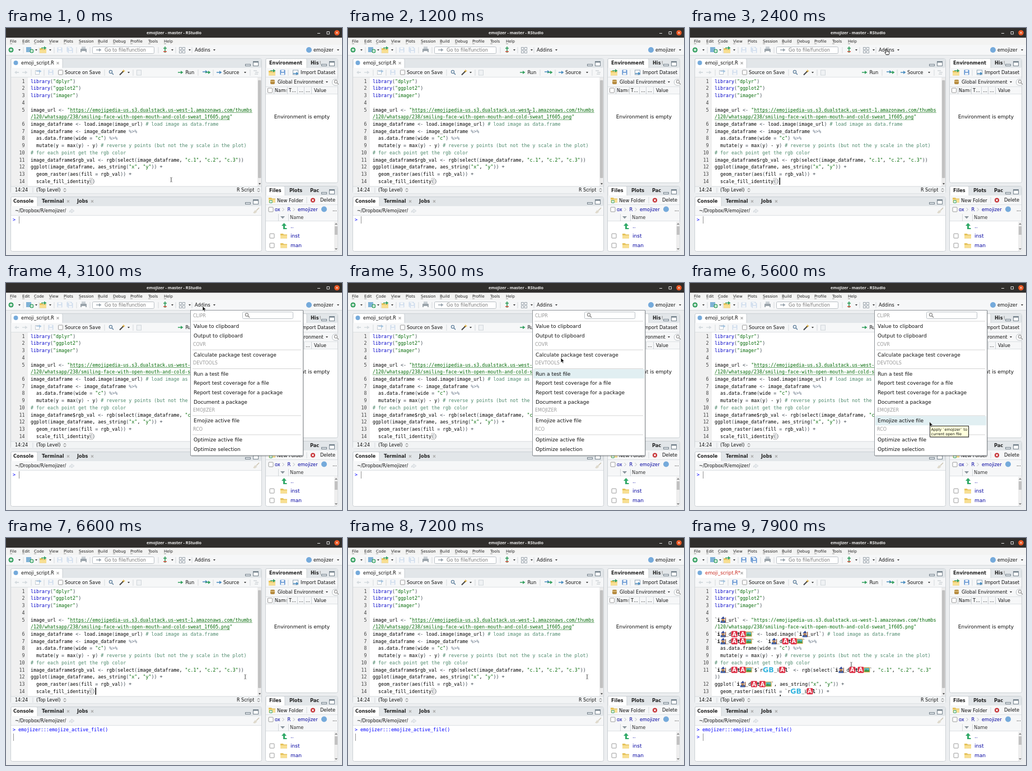
Animation, 600 px wide and 404 px high, one loop 8 s. Source, as an HTML page:

```html
<!DOCTYPE html>
<html lang="en">
<head>
<meta charset="utf-8">
<title>Emojizer addin</title>
<style>
html, body { margin: 0; width: 100%; height: 100%; overflow: hidden; background: #eceef0 }
svg { display: block; width: 600px; height: 404px }
text { white-space: pre; font-family: "DejaVu Sans", sans-serif }
.mono { font-family: "DejaVu Sans Mono", monospace }
.title { font-family: "Noto Sans", sans-serif }
</style>
</head>
<body>
<svg id="stage" viewBox="0 0 600 404"></svg>
<script>
const CW = 5.01, ROW = 12.73, MONO = CW / 0.602;
const LINK = '#0000a0', BLUE = '#0000ff', GREEN = '#036a07', BACK = '#eceef0', STRIP = '#e2e6e9', EDGE = '#cbd0d4';

// Drawing helpers return SVG markup; y of a text is its middle.
const rect = (x, y, w, h, fill, more = '') =>
  `<rect x="${x}" y="${y}" width="${w}" height="${h}" fill="${fill}" ${more}/>`;
const frame = (x, y, w, h, stroke, fill = '#fff', r = 0) =>
  rect(x + .5, y + .5, w - 1, h - 1, fill, `stroke="${stroke}" rx="${r}"`);
const circle = (x, y, r, fill, more = '') => `<circle cx="${x}" cy="${y}" r="${r}" fill="${fill}" ${more}/>`;
const path = (d, fill, stroke = 'none', w = 1) =>
  `<path d="${d}" fill="${fill}" stroke="${stroke}" stroke-width="${w}"/>`;
const line = (d, stroke, w = 1) => path(d, 'none', stroke, w);
const group = (id, body, more = '') => `<g id="${id}" ${more}>${body}</g>`;
const esc = s => s.replace(/&/g, '&amp;').replace(/</g, '&lt;');
const text = (x, y, s, size = 8.25, fill = '#111', more = '') =>
  `<text x="${x}" y="${y + size * .36}" font-size="${size}" fill="${fill}" ${more}>${esc(s)}</text>`;
const bold = (x, y, s) => text(x, y, s, 8.2, '#222', 'font-weight="700"');
const mono = (x, y, s, fill, more = '') => text(x, y, s, MONO, fill, 'class="mono" ' + more);

// Icons
const caret = (x, y) => path(`M${x - 2} ${y - 1}h4l-2 2.5z`, '#333');
const chevron = (x, y) => line(`M${x - 1.5} ${y - 3}l3 3l-3 3`, '#b4b9bd');
const cross = (x, y, c = '#aaa') => line(`M${x - 2} ${y - 2}l4 4m0-4l-4 4`, c, 1.2);
const sep = (x, y) => line(`M${x} ${y - 5}v11`, '#d5d9dc');
const check = (x, y) => frame(x - 4.5, y - 4.5, 9, 9, '#9a9a9a', '#fff', 1);
const plus = (x, y, r = 4.5) => circle(x, y, r, '#35a060') + line(`M${x - 2.5} ${y}h5M${x} ${y - 2.5}v5`, '#fff', 1.4);
const folder = (x, y) => path(`M${x - 6} ${y - 4}h5l1 1.5h6v7h-12z`, '#e5c25c') +
  rect(x - 6, y - 1, 12, 5, '#f8df92');
const disk = (x, y, c = '#5b8fd0') => rect(x - 4.5, y - 4.5, 9, 9, c, 'rx="1"') +
  rect(x - 2.5, y - 4, 5, 3, '#fff') + rect(x - 3, y + .5, 6, 4, '#eef3f8');
const arrow = (x, y, c) => line(`M${x - 5} ${y}h7`, c, 1.5) + path(`M${x} ${y - 3}l4.5 3l-4.5 3z`, c);
const glass = (x, y, c) => circle(x, y, 2.6, 'none', `stroke="${c}" stroke-width="1.2"`) +
  line(`M${x + 2} ${y + 2}l3 3`, c, 1.5);
const lines = (x, y, c) => line(`M${x - 4} ${y - 3}h6m-3 3h6m-7 3h6`, c, 1.2);
const paneButtons = (x, y) => frame(x - 5, y + 1, 10, 4, '#75828c', '#dfe4e8') +
  frame(x + 9, y - 4, 10, 9, '#75828c') + rect(x + 9, y - 4, 10, 2.5, '#75828c');
const pane = (x, y, w, h) => frame(x, y, w, h, EDGE, '#fff', 3) + rect(x + 1, y + 1, w - 2, 16, STRIP, 'rx="2"');
const tab = (x, y, w) => path(`M${x} ${y + 17}v-15q0-2 2-2h${w - 4}q2 0 2 2v15z`, '#fff', EDGE);
const bar = (x, y, w, h = 17) => rect(x, y, w, h, '#f6f7f8') + line(`M${x} ${y + h - .5}h${w}`, '#dde1e4');

// Emoji drawn at the left edge x of a code row with middle y
const badge = (x, y) => rect(x - .3, y - 5.5, 11, 11, '#dd2e44', 'rx="1.5"') +
  text(x + 5.2, y, 'A', 10, '#fff', 'font-weight="700" text-anchor="middle"');
const mage = (x, y) => path(`M${x + 1} ${y + 5.5}q0-5 4.5-5t4.5 5z`, '#3d5fa8') + circle(x + 5.3, y - .5, 2.7, '#d9a066') +
  path(`M${x + 1.5} ${y - 1.5}l4.5-4.5l3 4.5z`, '#384f9b') + path(`M${x + 3} ${y + .5}h5l-2.5 4z`, '#8b6a52') +
  line(`M${x + 10} ${y - 4}v9`, '#8a4b22', 1.2);
const picture = (x, y) => rect(x, y - 4.5, 11, 9, '#d9a441') + rect(x + 1.2, y - 3.3, 8.6, 6.6, '#55b8c8') +
  path(`M${x + 1.2} ${y + 3.3}v-2l3-2.5l2.5 2l1.5-1l1.6 1.5v2z`, '#3f9a4c');
const letters = (x, y) => text(x, y, 'GB', 12.5, '#35b5e0', 'font-weight="700"');
const victory = (x, y) => line(`M${x + 1} ${y - 3}l1 4l1.3-4M${x + 1.3} ${y + 1}h2v2h-2z`, '#777', .9);
const GLYPHS = { '§': [mage, 10.5], 'Å': [badge, 10.5], '¤': [picture, 10.5], 'Ø': [letters, 20], '¢': [victory, 4.5] };
const THICK = { 'ï': 'i', 'ŧ': 't', 'ł': 'l' };

function codeRow(s, y, underline) {
  let x = 44, out = '';
  const tokens = s.match(/#.*|"[^"]*("|$)|^\/120.*|library|<-|%>%|[§Å¤Ø¢ïŧł]|[()+=]| +|[^ "()§Å¤Ø¢ïŧł]+/g) || [];
  for (const k of tokens) {
    if (GLYPHS[k]) {
      out += GLYPHS[k][0](x, y);
      x += GLYPHS[k][1];
    } else if (THICK[k]) {
      out += mono(x - .3, y, THICK[k], '#000', 'font-weight="700"');
      x += 4.5;
    } else {
      const fill = k[0] == '#' ? '#4c886b' : /^"|^\/120/.test(k) ? GREEN : k == 'library' ? '#0000c8' :
        k == '%>%' ? '#687687' : /^(<-|[()+=])$/.test(k) ? '#3c4650' : '#000';
      out += mono(x, y, k, fill);
      if (underline && /https|^\/120/.test(k)) {
        const start = k[0] == '"' ? CW : 0;
        out += line(`M${x + start} ${y + 4.9}h${(k.length - 1) * CW}`, GREEN, .6);
      }
      x += k.length * CW;
    }
  }
  return out;
}

// A row starting with "~" continues the line above.
function listing(src, underline) {
  let n = 0;
  return src.split('\n').map((s, i) => {
    const y = 94.6 + i * ROW, wrapped = s[0] == '~';
    return (wrapped ? '' : mono(33.5, y, String(++n), '#444', 'text-anchor="end"')) +
      codeRow(wrapped ? s.slice(1) : s, y, underline);
  }).join('');
}

const HEAD = 'library("dplyr")\nlibrary("ggplot2")\nlibrary("imager")\n\n';
const URL_ROWS = ' <- "https://emojipedia-us.s3.dualstack.us-west-1.amazonaws.com/thumbs\n' +
  '~/120/whatsapp/238/smiling-face-with-open-mouth-and-cold-sweat_1f605.png"\n';
const script = (url, df, val, wrap) => HEAD + url + URL_ROWS +
`${df} <- load.image(${url}) # load image as data.frame
${df} <- ${df} %>%
  as.data.frame(wide = "c") %>%
  mutate(y = max(y) - y) # reverse y points (but not the y scale in the plot)
# for each point get the rgb color
${df}$${val} <- rgb(select(${df}, "c.1", "c.2", "c.3"${wrap}))
ggplot(${df}, aes_string("x", "y")) +
  geom_raster(aes(fill = ${val})) +
  scale_fill_identity()`;
const plainCode = script('image_url', 'image_dataframe', 'rgb_val', '');
const emojiCode = script('`ï§_url`', '`ï§_dÅŧÅ¤`', '`rØ_¢Åł`', '\n~');

function windowTop() {
  let s = rect(0, 0, 600, 17.5, '#302e2c') +
    text(300, 8.7, 'emojizer - master - RStudio', 7.3, '#eee', 'class="title" font-weight="700" text-anchor="middle"') +
    line('M556 9.5h5M573 6.5h4.500v4.500h-4.500z', '#ddd') + circle(591, 8.5, 4.8, '#e95420') +
    line('M589.200 6.700l3.600 3.600m0-3.600l-3.600 3.600', '#fff') +
    rect(0, 17.5, 600, 13, '#f3f3f2') + rect(0, 30, 600, 18, '#f6f7f8') + line('M0 48.500h600', '#d5d9dc');
  const menus = { File: 7, Edit: 29, Code: 50, View: 77, Plots: 103, Session: 130, Build: 164, Debug: 191, Profile: 222, Tools: 254, Help: 282 };
  for (const m in menus) s += text(menus[m], 23.7, m, 7, '#222') + line(`M${menus[m]} 28h4`, '#555', .6);
  return s + plus(9, 39) + caret(24, 39) + sep(31, 39) + rect(36, 34, 9, 9, '#7fb2d6') + plus(46, 41, 3.5) + caret(54, 39) + sep(59, 39) +
    folder(66, 40) + arrow(68, 35.5, '#35a060') + caret(79, 39) + sep(86, 39) +
    group('saveTop', disk(96, 39) + disk(113, 38) + disk(115, 40)) + sep(126, 39) +
    rect(133, 37, 11, 6, '#9aa3aa', 'rx="1"') + rect(135, 33, 7, 4, '#c9d0d5') + rect(135, 41, 7, 3, '#fff') + sep(150, 39) +
    frame(154, 33, 111, 13, '#b9bfc4', '#fff', 2) + arrow(166, 39, '#9aa5ae') + text(176, 39.3, 'Go to file/function', 8.25, '#777') +
    sep(272, 39) + line('M281 36h6M284 33v11', '#2e9a58', 1.6) + line('M281 42h6', '#d84a3a', 1.6) + caret(297, 39) + sep(303, 39) +
    [309, 315].map(x => frame(x, 34, 5, 5, '#9aa4ac') + frame(x, 40, 5, 5, '#9aa4ac')).join('') + caret(328, 39) + sep(332, 39) +
    text(337, 39, 'Addins') + caret(372, 39) +
    circle(541, 39, 5, '#75aadb') + text(549, 39, 'emojizer') + caret(593, 39);
}

const editorChrome = () => pane(8, 54, 449, 241) + tab(9, 54.5, 92) + circle(17.5, 62, 4, '#75aadb') +
  group('tabClean', text(27, 62, 'emoji_script.R', 8.35)) + group('tabDirty', text(27, 62, 'emoji_script.R*', 8.35, '#c8281e')) +
  cross(92.5, 62.5) + paneButtons(432, 63) + bar(9, 71, 447) +
  path('M23 78h-4v-2l-4 3l4 3v-2h4z', '#d5dbdf') + arrow(34, 79, '#d5dbdf') + sep(45, 79) + frame(52, 75, 8, 8, '#c3cad0') +
  arrow(59, 77, '#a5c3df') + sep(68, 79) + group('saveDoc', disk(80, 79)) + check(97.5, 79) + text(105, 79, 'Source on Save') + sep(176, 79) +
  glass(187, 78, '#5f7f9d') + line('M203 83.500l7-7', '#444', 2) + line('M210 74v5m-2.500-2.500h5', '#e0aa2c') + caret(219, 79) + sep(227, 79) +
  frame(233, 74.5, 9, 10, '#cfd5da', '#f0f2f4') + arrow(312, 79, '#35a060') + text(320.5, 79, 'Run') + sep(343, 79) +
  arrow(356, 78, '#4c8ec0') + arrow(361, 79, '#35a060') + sep(370, 79) + arrow(381, 79, '#4c8ec0') + text(388, 79, 'Source') + caret(427, 79) + sep(436, 79) +
  lines(446, 79, '#bcc3c8') + rect(9, 88, 30, 194, '#f0f0f0') + rect(449, 88, 7, 194, '#ececec') + rect(450, 93, 5.5, 174, '#c1c1c1', 'rx="1"') +
  path('M451 276l2 3l2-3z', '#555');

const editorStatus = () => rect(9, 282, 447, 12.5, '#f2f4f5') + line('M9 282h447', '#d5d9dc') + text(16, 288.5, '14:24', 8) + line('M48 284v9', '#d5d9dc') +
  text(54, 288.5, '(Top Level)', 8) + line('M103 287.500l2-2l2 2m-4 2l2 2l2-2', '#444', .9) +
  text(412, 288.5, 'R Script', 8) + line('M449 287.500l2-2l2 2m-4 2l2 2l2-2', '#444', .9);

const consolePane = () => pane(8, 300, 449, 98) + tab(9, 300.5, 47) + bold(13, 308.5, 'Console') + bold(64, 308.5, 'Terminal') +
  cross(111, 308.5) + bold(127, 308.5, 'Jobs') + cross(154, 308.5) + paneButtons(432, 309) +
  bar(9, 317, 447) + text(16, 325.5, '~/Dropbox/R/emojizer/', 8) + path('M113 328q0-4 4-4v-2l5 3.500l-5 3.500v-2q-3 0-4 1z', '#e8ebee', '#c5cbd0', .6) +
  line('M452 320l-5 5', '#c8bfa8', 1.2) + path('M441 329l4-5l3.500 3l-4 3z', '#ded9cc') +
  mono(12, 341.5, '>', BLUE) +
  group('idle', line('M23.500 335v13', '#777', .8)) +
  group('command', mono(22, 341.5, 'emojizer:::emojize_active_file()', BLUE)) +
  group('busy', line('M13.500 348v13', '#777', .8)) +
  group('ready', mono(12, 354, '>', BLUE) + line('M23.500 348v13', '#777', .8));

const environment = () => pane(463, 54, 130, 222) + tab(464, 54.5, 73) + bold(470, 62, 'Environment') + bold(544, 62, 'His') + text(560, 62, 't', 8.2, '#888') +
  rect(562, 55, 30, 15, STRIP) + paneButtons(568, 63) + bar(464, 71, 128) + folder(475, 80) + arrow(477, 76, '#35a060') + disk(494, 79) + sep(504, 79) +
  frame(512, 74.5, 10, 9, '#8ea2b3') + arrow(518, 81, '#4c8ec0') + text(526, 79, 'Import Dataset') + bar(464, 88, 128) +
  rect(472, 92, 8, 8, '#b58a3f', 'rx="2"') + line('M472 95h8', '#f0d9a0') + text(485, 96, 'Global Environment') + caret(573, 96) +
  frame(582, 90.5, 14, 12, '#b9bfc4', '#fff', 5) + rect(592.5, 89, 7.5, 15, BACK) + glass(589, 95.5, '#999') +
  bar(464, 105, 128, 13) + check(471.5, 111) + text(480, 111.3, 'Nam', 8) + text(498, 111.3, 'e', 8, '#999') + text(505, 111.3, 'T…', 8) +
  text(523, 111.3, '…', 8) + text(535, 111.3, '…', 8) + text(550, 111.3, 'Value', 8) +
  line('M478.500 105v13M502.500 105v13M520.500 105v13M532.500 105v13M545.500 105v13', '#cdd2d6') +
  text(528.5, 158, 'Environment is empty', 9, '#111', 'text-anchor="middle"');

function files() {
  let s = pane(463, 281, 130, 117) + tab(464, 281.5, 34) + bold(470, 289, 'Files') + bold(506, 289, 'Plots') + bold(543, 289, 'Pac') + paneButtons(568, 291) +
    bar(464, 298, 128) + folder(475, 306) + plus(473, 309, 3) + text(484, 306.5, 'New Folder', 8.4) + sep(537, 306) +
    circle(548, 306.5, 4, '#c3272b') + line('M546.300 304.800l3.400 3.400m0-3.400l-3.400 3.400', '#fff', 1.3) + text(561, 306.5, 'Delete') +
    bar(464, 315, 128) + check(473, 323) + text(480, 323, 'ox', 8.25, LINK) + chevron(495, 323) + text(502.5, 323, 'R', 8.25, LINK) +
    chevron(514, 323) + text(521, 323, 'emojizer', 8.25, LINK) + circle(568, 322.5, 5, '#75aadb') + text(583, 323, '...', 8.25) +
    bar(464, 331, 128, 13) + path('M490 335h8l-4 4.500z', '#8a959d') + text(507, 337.5, 'Name', 8.25, '#333') + line('M486.500 331v13M504.500 331v13', '#d2d7da') +
    path('M492 352l4.500-5l4.500 5h-3v4h3.500v2h-6.500v-6z', '#2fa866') + text(508, 353, '..', 9, LINK);
  ['inst', 'man'].forEach((name, i) => {
    const y = 370 + i * 17;
    s += check(475, y) + folder(496, y) + text(508, y, name, 9, LINK);
  });
  return s + rect(586, 345, 6.5, 52, '#eee') + rect(587, 353, 5, 15, '#c1c1c1') +
    path('M587 350l2.500-3l2.500 3zM587 392l2.500 3l2.500-3z', '#888');
}

const ITEMS = [[77, 'Value to clipboard'], [94, 'Output to clipboard'], [128, 'Calculate package test coverage'], [161.5, 'Run a test file'],
  [178, 'Report test coverage for a file'], [195, 'Report test coverage for a package'], [211.5, 'Document a package'],
  [245, 'Emojize active file'], [279, 'Optimize active file'], [296, 'Optimize selection']];
const HEADERS = [[58, 'CLIPR'], [109, 'COVR'], [142.5, 'DEVTOOLS'], [226, 'EMOJIZER'], [260, 'RCO']];
const addinMenu = () => rect(331, 50, 201, 259, '#000', 'opacity=".15"') + frame(329, 48, 202, 259.5, '#8f9499') +
  rect(331, 0, 198, 16.5, '#e1eff2', 'id="hover"') +
  HEADERS.map(([y, s]) => text(334, y, s, 8, '#999') + line(`M333 ${y + 10}h194`, '#c9c9c9', .8)).join('') +
  ITEMS.map(([y, s]) => text(335, y, s, 9)).join('') + frame(422, 51, 91, 13, '#b9bfc4', '#fff', 2) + glass(430, 56.5, '#888');
const tooltip = () => rect(429.5, 256, 69, 19.5, '#000', 'opacity=".2"') + frame(428, 254, 70, 20.5, '#222', '#ffffdc') +
  text(430.5, 260.5, 'Apply `emojizer` to', 6.6) + text(430.5, 269, 'current open file', 6.6);

const pointers = () => group('beam', line('M-2 -4q2 0 2 1v6q0 1 -2 1M2 -4q-2 0 -2 1v6q0 1 2 1', '#444', .6)) +
  group('arrow', path('M0 0v8.500l2-1.800l1.400 3l1.400-.6l-1.300-3h2.600z', '#111', '#fff', .6)) +
  group('finger', path('M-1.200 -3q1.200-1 2 0v3.500l4 1v3l-1 2h-4.500l-2.500-4l1-.5l1 1z', '#fff', '#111', .9));

const stage = document.getElementById('stage');
stage.innerHTML = '<clipPath id="page"><path d="M9 88h440v194.500h-440z"/></clipPath>' + rect(0, 0, 600, 404, BACK) + windowTop() + editorChrome() +
  group('codeView', group('before', frame(149, 267, 6, 12, '#c4c4c4') + listing(plainCode, true)) + group('after', listing(emojiCode, false)) +
    rect(159.5, 266.5, 1.5, 12.5, '#000', 'id="caret"') + rect(160.5, 279, 1.5, 12, '#000', 'id="caretAfter"'), 'clip-path="url(#page)"') +
  editorStatus() + consolePane() + environment() + files() +
  group('menu', addinMenu()) + group('tip', tooltip()) + group('pointer', pointers());

const part = id => document.getElementById(id);
const show = (id, on) => part(id).style.display = on ? '' : 'none';

const LOOP = 8000, OPEN = 3100, TIP = 5000, CLOSE = 6300, RUN = 6600, DONE = 7500;
const TRACK = [[100, 295, 270], [2200, 351, 41], [OPEN, 351, 41], [3500, 380, 133], [4000, 429, 234],
  [4300, 428, 247], [7250, 427, 247], [7900, 288, 225]];

function pointerAt(t) {
  const i = TRACK.findIndex(k => k[0] > t);
  if (i < 1) return TRACK[i ? TRACK.length - 1 : 0].slice(1);
  const [t0, x0, y0] = TRACK[i - 1], [t1, x1, y1] = TRACK[i], u = (t - t0) / (t1 - t0);
  return [x0 + (x1 - x0) * u, y0 + (y1 - y0) * u];
}

function draw(t) {
  const open = t >= OPEN && t < CLOSE, done = t >= DONE, [x, y] = pointerAt(t);
  part('pointer').setAttribute('transform', `translate(${x} ${y})`);
  const beam = !open && y > 88 && y < 282, finger = !open && y < 48;
  show('beam', beam);
  show('finger', finger);
  show('arrow', !beam && !finger);

  show('menu', open);
  show('tip', open && t >= TIP);
  const aim = pointerAt(t + 80)[1];  // the highlight runs a little ahead of the pointer
  const item = ITEMS.reduce((a, b) => Math.abs(b[0] - aim) < Math.abs(a[0] - aim) ? b : a);
  part('hover').setAttribute('y', item[0] - 8.2);
  show('hover', aim > 68);

  show('before', !done);
  show('after', done);
  show('caret', !open && !done && t % 1000 >= 300 && t % 1000 < 800);
  show('caretAfter', done);
  show('tabClean', !done);
  show('tabDirty', done);
  for (const id of ['saveTop', 'saveDoc']) part(id).setAttribute('opacity', done ? 1 : .25);

  show('idle', t < RUN);
  show('command', t >= RUN);
  show('busy', t >= RUN && !done);
  show('ready', done);
}

function tick(now) {
  draw(now % LOOP);
  requestAnimationFrame(tick);
}
draw(0);
requestAnimationFrame(tick);
</script>
</body>
</html>
```
